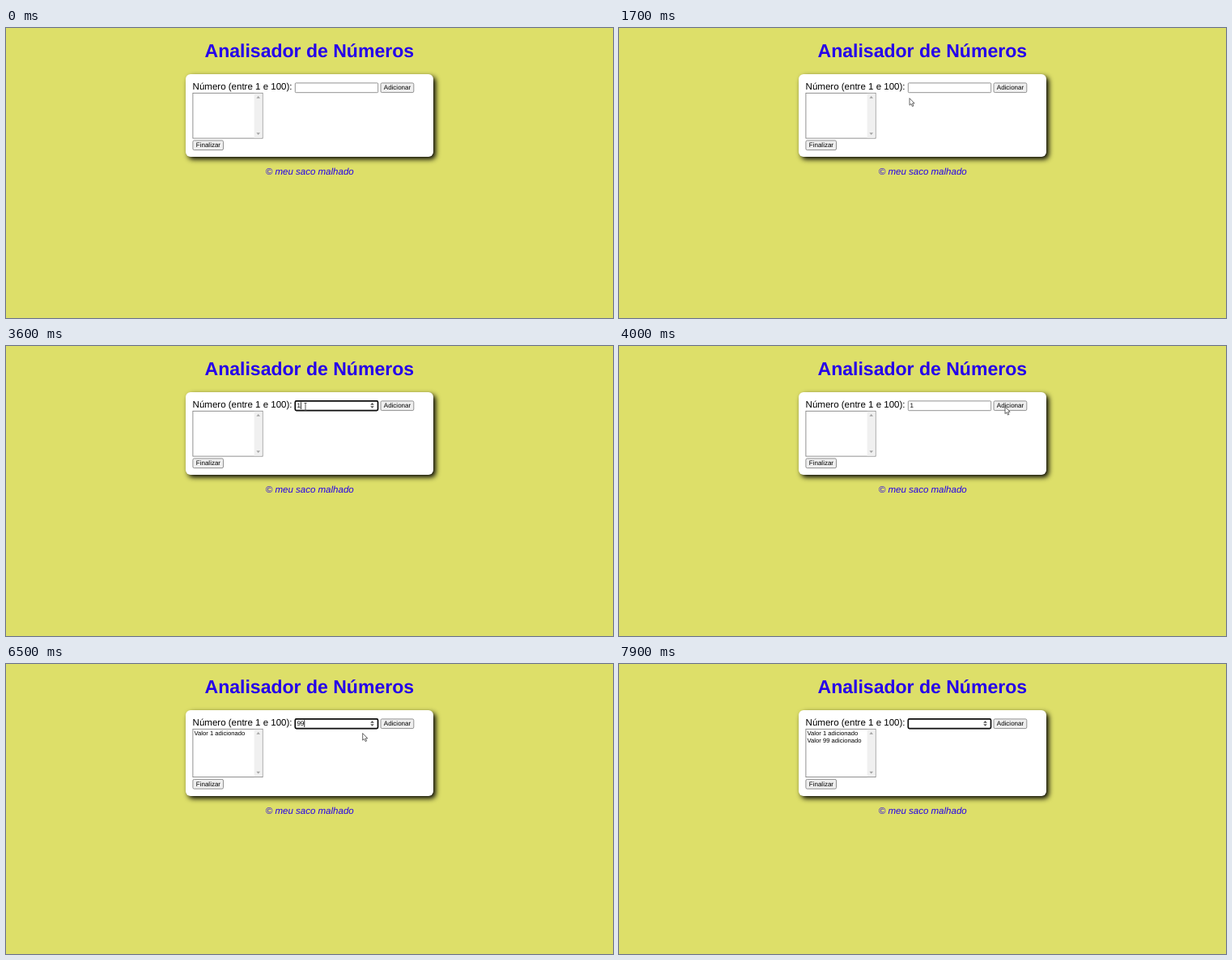
Animation of 750x358 px, one loop 8 s. Source, as an HTML page:

```html
<!DOCTYPE html>
<html lang="pt-br">
<head>
<meta charset="utf-8">
<title>Analisador de Números</title>
<style>
html, body { margin: 0; width: 100%; height: 100%; overflow: hidden; background: #dddf69; }
#card {
  position: absolute; left: 222px; top: 57px; width: 306px; height: 102px;
  background: #fff; border-radius: 6px; box-shadow: 3px 3px 6px #000;
}
svg { position: absolute; left: 0; top: 0; display: block; }
text { font-family: "Liberation Sans", Arial, sans-serif; font-size: 8px; text-rendering: geometricPrecision; white-space: pre; }
.big { font-size: 11.52px; }
.blue { fill: #2500ea; text-anchor: middle; }
.item { font-size: 7.66px; }
.box { fill: #fff; stroke: #767676; stroke-width: .8; }
.btn { fill: #efefef; stroke: #767676; stroke-width: .8; }
</style>
</head>
<body>
<div id="card"></div>
<svg width="750" height="358" viewBox="0 0 750 358">
  <text class="blue" x="374.8" y="36.4" style="font-size:23.04px;font-weight:bold">Analisador de Números</text>
  <text class="big" x="230.6" y="76.3">Número (entre 1 e 100):</text>

  <rect id="field" class="box" x="357.3" y="67.9" width="102.4" height="11.8" rx="1"/>
  <g id="focus">
    <rect x="357.3" y="67.8" width="102.2" height="11.9" rx="1.6" fill="none" stroke="#101010" stroke-width="1.7"/>
    <path d="M450.2 72.7h4.6l-2.3-2.6zM450.2 74.2h4.6l-2.3 2.6z" fill="#505050"/>
  </g>
  <text id="value" x="359.4" y="76.2"></text>
  <rect id="caret" y="69.2" width=".8" height="8.8"/>

  <rect class="btn" x="463" y="67.9" width="40.8" height="11.7" rx="1.6"/>
  <text x="466.8" y="76.2">Adicionar</text>

  <rect id="list" class="box" x="230.9" y="80.3" width="86.2" height="55.8"/>
  <rect id="bar" x="306.6" y="80.8" width="10" height="54.8" fill="#f0f0f0"/>
  <path d="M309.4 86.8h4.6l-2.3-2.7z" fill="#a3a3a3"/>
  <text id="first" class="item" x="232.5" y="87.5">Valor 1 adicionado</text>
  <text id="second" class="item" x="232.5" y="97.1">Valor 99 adicionado</text>

  <g id="lower">
    <path d="M309.4 129.2h4.6l-2.3 2.7z" fill="#a3a3a3"/>
    <rect class="btn" x="230.9" y="138.9" width="37.6" height="11.7" rx="1.6"/>
    <text x="234.8" y="147.2">Finalizar</text>
    <text class="blue big" x="375.2" y="181.2" font-style="italic">© meu saco malhado</text>
  </g>

  <g id="cursor">
    <path id="arrow" d="M0 0V8.6L2 6.9 3.4 10.1 4.9 9.4 3.5 6.3H6.1Z" fill="#fff" stroke="#333" stroke-width=".75"/>
    <path id="beam" d="M-1.5-4.5h3M0-4.5v9M-1.5 4.5h3" fill="none" stroke="#333" stroke-width=".8"/>
  </g>
</svg>
<script>
const $ = id => document.getElementById(id);
const show = (id, on) => $(id).style.display = on ? "" : "none";
const LOOP = 8000, STEP = 100, GROWTH = 3.5;

// start time, field text, focused
const states = [
  [0, "", false], [2000, "", true], [3600, "1", true], [4000, "1", false], [4200, "", true],
  [5900, "9", true], [6100, "99", true], [6900, "99", false], [7000, "", true]
];

// visible until `end`; points are time, x, y
const moves = [
  { end: 2300, points: [[900, 331, 214], [1300, 338, 101], [1700, 359, 86.7], [2000, 367, 74]] },
  { end: 4400, points: [[3600, 370, 75], [4000, 477, 75]] },
  { end: 7300, points: [[6300, 424, 82], [6500, 440.7, 85.5], [6800, 477, 76]] }
];

function pointAt(points, t) {
  const i = points.findIndex(p => p[0] > t);
  if (i < 0) return points[points.length - 1].slice(1);
  const [a, b] = [points[i - 1], points[i]];
  const k = (t - a[0]) / (b[0] - a[0]), e = k * k * (3 - 2 * k);
  return [a[1] + (b[1] - a[1]) * e, a[2] + (b[2] - a[2]) * e];
}

function drawCursor(t) {
  const move = moves.find(m => t >= m.points[0][0] && t < m.end);
  show("cursor", move);
  if (!move) return;
  const [x, y] = pointAt(move.points, t);
  const overField = x > 357 && x < 460 && y > 67 && y < 80;
  show("beam", overField);
  show("arrow", !overField);
  $("cursor").setAttribute("transform", `translate(${x} ${y})`);
}

function draw(t) {
  const [start, text, focused] = states.filter(s => s[0] <= t).pop();
  const grow = t >= 4200 ? GROWTH : 0;
  $("value").textContent = text;
  show("focus", focused);
  show("caret", focused && Math.floor((t - start) / 500) % 2 === 0);
  $("caret").setAttribute("x", 359.5 + text.length * 4.45);
  show("first", t >= 4200);
  show("second", t >= 7000);
  $("card").style.height = 102 + grow + "px";
  $("list").setAttribute("height", 55.8 + grow);
  $("bar").setAttribute("height", 54.8 + grow);
  $("lower").setAttribute("transform", `translate(0 ${grow})`);
  drawCursor(t);
}

let origin;
function tick(now) {
  origin ??= now;
  draw(Math.floor((now - origin) % LOOP / STEP) * STEP);
  requestAnimationFrame(tick);
}
draw(0);
requestAnimationFrame(tick);
</script>
</body>
</html>
```
